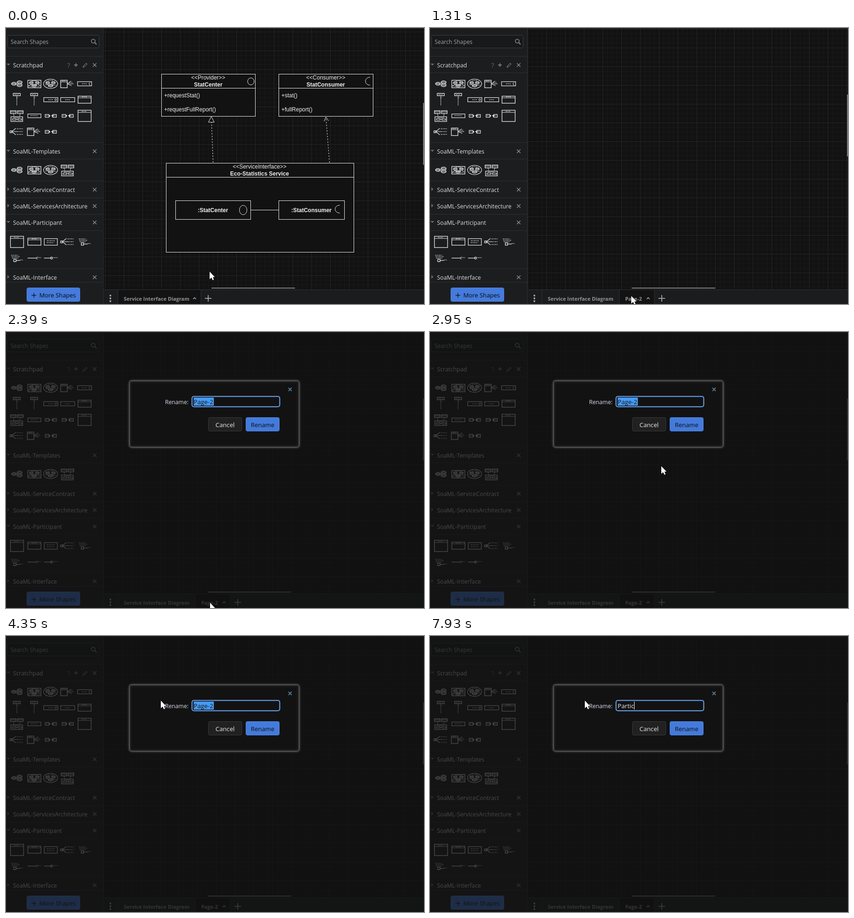
These frames come from a looping animation (891x589 px, 8000 ms). An HTML page with a canvas:

```html
<!DOCTYPE html>
<html lang="en">
<head>
<meta charset="utf-8">
<title>Rename page</title>
<style>
html, body { margin: 0; width: 100%; height: 100%; overflow: hidden; background: #121212; }
canvas { display: block; }
</style>
</head>
<body>
<canvas id="stage" width="891" height="589"></canvas>
<script>
const c = document.getElementById('stage').getContext('2d');
const W = 891, H = 589, LOOP = 8000;
const UI = '"Open Sans", "Noto Sans", sans-serif';
const ARIAL = '"Liberation Sans", Arial, sans-serif';
const INK = '#e8e8e8';

// Drawing helpers
function fill(x, y, w, h, color) {
  c.fillStyle = color;
  c.fillRect(x, y, w, h);
}
function box(x, y, w, h, color = INK, width = 1) {
  c.strokeStyle = color;
  c.lineWidth = width;
  c.strokeRect(x + .5, y + .5, w, h);
}
function line(points, color = INK, width = 1, dash = []) {
  c.strokeStyle = color;
  c.lineWidth = width;
  c.setLineDash(dash);
  c.beginPath();
  for (let i = 0; i < points.length; i += 2) c.lineTo(points[i], points[i + 1]);
  c.stroke();
  c.setLineDash([]);
}
function poly(points, color, edge) {
  c.beginPath();
  for (let i = 0; i < points.length; i += 2) c.lineTo(points[i], points[i + 1]);
  c.closePath();
  c.fillStyle = color;
  c.fill();
  if (edge) { c.strokeStyle = edge; c.lineWidth = 1; c.stroke(); }
}
function oval(x, y, rx, ry, from = 0, to = 2 * Math.PI, width = 1, color = INK) {
  c.strokeStyle = color;
  c.lineWidth = width;
  c.beginPath();
  c.ellipse(x, y, rx, ry, 0, from, to);
  c.stroke();
}
function round(x, y, w, h, r, color, edge, width = 1) {
  c.beginPath();
  c.roundRect(x + .5, y + .5, w, h, r);
  c.fillStyle = color;
  c.fill();
  c.strokeStyle = edge;
  c.lineWidth = width;
  c.stroke();
}
function text(str, x, y, font, color = INK, align = 'left') {
  c.font = font;
  c.fillStyle = color;
  c.textAlign = align;
  c.fillText(str, x, y);
}
function cross(x, y, r, color, width = 1.3) {
  line([x - r, y - r, x + r, y + r], color, width);
  line([x - r, y + r, x + r, y - r], color, width);
}
function plus(x, y, r, color, width = 1.5) {
  line([x - r, y, x + r, y], color, width);
  line([x, y - r, x, y + r], color, width);
}

// Shape thumbnails, each drawn around its own centre
const dots = (x, y, w) => line([x, y, x + w, y], INK, 1.2, [3, 1, 2, 1]);
const pill = (x, y, rx = 5, ry = 2.5) => {
  oval(x, y, rx, ry, 0, 7, 1.3);
  line([x - rx + 1, y, x + rx - 1, y], INK, 1.2);
};
const thumbs = {
  contract() {
    pill(-6, 0, 5, 3); pill(6, -3, 5.5, 3); pill(6, 3, 5.5, 3);
    dots(-12, 0, 12);
  },
  network() {
    box(-14, -8, 28, 16, INK, 1.3);
    dots(-5, -6, 10); pill(-6, -2, 4); pill(7, -2, 4); pill(0, 4, 5);
    line([-13, 5, -6, 1, 0, 4, 7, 0, 13, 4]);
    dots(-12, 5, 6); dots(7, 5, 6);
  },
  cloud() {
    oval(0, 0, 15, 10, 0, 7, 1.2);
    dots(-5, -7, 10); pill(-6, -2, 4); pill(6, -2, 4); pill(0, 4, 5);
    dots(-11, 2, 6); dots(6, 3, 6);
  },
  part() {
    box(-15, -8, 14, 16, INK, 1.3);
    line([-15, -4, -1, -4]); dots(-12, -6, 8);
    line([8, -6, -1, 0, 9, 4]); line([-1, 0, 13, 0]); dots(3, -3, 8);
  },
  roleC() { bar(); oval(12, 0, 2, 2.5, 1.2, 5); },
  roleO() { bar(); oval(11, 0, 2, 2); },
  role() { bar(); },
  lifeline() {
    box(-8, -14, 15, 5, INK, 1.3);
    dots(-5, -11, 9);
    line([0, -8, 0, 13], INK, 1.2, [2, 1]);
    line([-1, -4, 2, -4]);
  },
  panel() {
    box(-14, -8, 28, 15, INK, 1.3);
    line([-14, -4, 14, -4]); dots(-5, -6, 10);
  },
  window() {
    box(-14, -12, 28, 24, INK, 1.3);
    line([-14, -7, 14, -7]); dots(-6, -9, 11);
  },
  iface() {
    box(-14, -11, 12, 6, INK, 1.3); box(1, -11, 12, 6, INK, 1.3);
    line([-14, -8, -2, -8]); line([1, -8, 13, -8]);
    line([-7, -4, -6, 2], INK, 1.2, [2, 1]); line([7, -4, 6, 2], INK, 1.2, [2, 1]);
    box(-13, 2, 25, 10, INK, 1.3); dots(-7, 4.5, 14);
    box(-10, 6, 8, 3); box(2, 6, 8, 3); line([-2, 8, 2, 8]);
  },
  plate() {
    box(-14, -4, 28, 8, INK, 1.2); dots(-8, 0, 16);
  },
  card() {
    box(-14, -7, 28, 14, INK, 1.2); dots(-8, -2, 17); dots(-8, 2, 15);
  },
  pair() {
    box(-12, -3, 8, 6, INK, 1.2); box(4, -3, 8, 6, INK, 1.2);
    dots(-10, 0, 5); dots(6, 0, 5); line([-3, 0, 4, 0], INK, 1, [2, 2]);
    fill(-4, -1, 3, 3, INK); fill(3, -1, 3, 3, INK);
  },
  fork() {
    box(-15, -2, 4, 4, INK, 1.3);
    line([-2, -7, -11, 0, -2, 7], INK, 1.2); line([-11, 0, 0, 0]);
    for (const y of [-6, 0, 6]) dots(0, y, 13);
  },
  port() {
    dots(-12, -6, 15); dots(-11, -3, 17); dots(-10, 0, 13);
    box(-7, 2, 5, 5, INK, 1.3); line([-2, 5, 7, 5], INK, 1.3); dots(7, 4, 6);
  },
  request() { line([-14, 0, 5, 0], INK, 1.3); oval(7, 0, 2, 2.5, 1.5, 4.8); dots(7, -1, 8); },
  service() { line([-14, 0, 0, 0], INK, 1.3); oval(2, 0, 2, 2, 0, 7, 1.4); dots(6, -1, 9); }
};
function bar() { box(-15, -5, 30, 9, INK, 1.2); dots(-5, 0, 11); }

const COLS = [23, 60, 95, 131, 167];
const shelf = {
  119: 'contract network cloud part roleC',
  153: 'lifeline lifeline roleO role panel',
  187: 'iface plate pair pair window',
  221: 'fork part pair',
  303: 'contract network cloud iface',
  456: 'window panel card fork port',
  491: 'port request service'
};
const sections = [
  ['Scratchpad', 79, 1], ['SoaML-Templates', 263, 1], ['SoaML-ServiceContract', 345, 0],
  ['SoaML-ServicesArchitecture', 380, 0], ['SoaML-Participant', 415, 1], ['SoaML-Interface', 532, 0]
];

function sidebar() {
  fill(0, 0, 208, H, '#1c1d1f');
  fill(207, 0, 1, H, '#2c2d2f');
  round(3, 15, 195, 27, 3, '#18191b', '#3d3e40');
  text('Search Shapes', 10, 34, '11.9px ' + UI, '#a2a2a2');
  oval(186, 28, 4, 4, 0, 7, 1.6, '#858585');
  line([189, 31, 193, 35], '#858585', 2);
  for (const y of [60, 95, 244, 279, 326, 362, 397, 432, 513]) fill(0, y, 207, 1, '#2e2f31');

  for (const [name, y, open] of sections) {
    text(name, 15, y + 5, '12.3px ' + UI, '#dedede');
    poly(open ? [1, y - 3, 9, y - 3, 5, y + 1] : [3, y - 5, 7, y - 1, 3, y + 3], '#6c6c6c');
    cross(189, y, 3.8, '#929292');
  }
  text('?', 131, 84, '12.3px ' + UI, '#777');
  plus(149, 79, 4, '#8e8e8e');
  poly([164, 84, 165, 81, 171, 75, 173, 77, 167, 83], '#1c1d1f', '#999');

  for (const y in shelf) shelf[y].split(' ').forEach((name, i) => {
    c.save();
    c.translate(COLS[i], +y);
    thumbs[name]();
    c.restore();
  });

  fill(0, 542, 207, 47, '#1c1d1f');
  fill(0, 542, 207, 1, '#2e2f31');
  round(44, 554, 113, 29, 3, '#447bdc', '#5288e4');
  plus(59.5, 570.5, 5, '#111', 1.3);
  text('More Shapes', 71, 575, '12.8px ' + UI, '#0c0c0c');
}

function grid(x0, y0) {
  for (const [step, color] of [[10, '#191919'], [40, '#252525']]) {
    for (let x = 208 + (x0 - 208) % step; x < W; x += step) fill(x, 0, 1, 558, color);
    for (let y = y0 % step; y < 558; y += step) fill(208, y, 683, 1, color);
  }
}

function label(str, x, y, bold, align = 'center') {
  text(str, x, y, (bold ? 'bold ' : '') + '12px ' + ARIAL, '#f0f0f0', align);
}
function classBox(x, w, kind, name, ops) {
  fill(x, 98, w, 90, '#121212');
  box(x, 98, w, 90);
  line([x, 128.5, x + w, 128.5]);
  label(`<<${kind}>>`, x + w / 2, 110);
  label(name, x + w / 2, 125, true);
  ops.forEach((op, i) => label(op, x + 6, 148 + 30 * i, false, 'left'));
}
function diagram() {
  classBox(331, 200, 'Provider', 'StatCenter', ['+requestStat()', '+requestFullReport()']);
  classBox(581, 201, 'Consumer', 'StatConsumer', ['+stat()', '+fullReport()']);
  oval(522, 114, 7, 7.5);
  oval(776, 113.5, 10, 8.5, Math.PI / 2, Math.PI * 1.5);

  line([441.5, 287, 438, 201], INK, 1, [3, 3]);
  poly([437.5, 189, 444, 201, 431.5, 201], '#121212', INK);
  line([689.5, 287, 682, 190], INK, 1, [3, 3]);
  line([678, 199, 682, 190, 687.5, 198]);

  fill(341, 288, 400, 190, '#121212');
  box(341, 288, 400, 190);
  line([341, 318.5, 741, 318.5]);
  label('<<ServiceInterface>>', 540.5, 300);
  label('Eco-Statistics Service', 540.5, 315, true);
  box(361, 368, 160, 40);
  box(581, 368, 140, 40);
  line([522, 388.5, 581, 388.5]);
  label(':StatCenter', 441, 393, true);
  label(':StatConsumer', 651, 393, true);
  oval(505.5, 388.5, 8, 10);
  oval(711.5, 386.5, 10, 8.5, Math.PI / 2, Math.PI * 1.5);
}

function tabBar(second, hover) {
  const tabFont = 'bold 10.85px ' + UI, gray = '#949494';
  fill(208, 558, 683, 31, '#1b1c1e');
  fill(208, 558, 683, 1, '#303133');
  const [left, right] = second ? [403, 478] : [238, 415];
  fill(left, 559, right - left, 30, '#131313');
  for (const x of [238, left, right]) fill(x, 559, 1, 30, '#303133');
  for (const y of [571, 577, 583]) {
    c.fillStyle = '#aaa';
    c.beginPath();
    c.arc(222.5, y, 1.9, 0, 7);
    c.fill();
  }
  text('Service Interface Diagram', 251, 582, tabFont, gray);
  if (second) text('Page-2', 416, 582, tabFont, gray);
  const caret = second ? 465 : 402;
  line([caret - 3, 578.5, caret, 575.5, caret + 3, 578.5], '#aaa', 1.6);
  plus(second ? 494 : 431, 577, 7, hover ? '#4a4a4a' : '#a8a8a8', 1.8);
}

function workspace(t) {
  const second = t >= 1310;
  fill(0, 0, W, H, '#121212');
  grid(second ? 248 : 251, second ? 2 : 8);
  if (!second) diagram();
  fill(208, 0, 683, 1, '#343434');
  fill(second ? 430 : 438, 554, 178, 2, '#7c7c7c');
  fill(889, second ? 142 : 160, 2, 132, '#7c7c7c');
  tabBar(second, t >= 840 && !second);
  sidebar();
  fill(0, 0, 208, 1, '#303030');
}

// Typed text: time of each keystroke
const keys = [7070, 7220, 7380, 7620, 7770, 7930];

function dialog(t, mouseX) {
  const font = '13.2px ' + UI;
  c.save();
  c.shadowColor = '#777';
  c.shadowBlur = 5;
  round(263, 104, 361, 141, 4, '#121212', '#666');
  c.restore();
  cross(605.5, 122.5, 3.5, '#527c9a', 1.8);
  text('Rename:', 389, 154, '12.2px ' + UI, '#d9dfec', 'right');
  round(396, 137, 187, 22, 4, '#121212', '#6aa5f4', 2);

  const typed = 'Partic'.slice(0, keys.filter(k => t >= k).length);
  const value = t < 5060 ? 'Page-2' : typed;
  text(value, 400, 154, font, '#eee');
  const selectFrom = t < 3650 ? 400 : t < 5060 ? Math.max(400, mouseX) : 443;
  if (selectFrom < 443) {
    c.save();
    c.beginPath();
    c.rect(selectFrom, 140, 443 - selectFrom, 17);
    c.clip();
    fill(400, 140, 43, 17, '#479bf3');
    text(value, 400, 154, font, '#10151c');
    c.restore();
  }
  const caret = (t >= 3650 && t < 3880) || (t >= 5590 && t < 6140) || t >= 6680;
  if (caret) {
    c.font = font;
    fill(t < 5060 ? 443 : 400 + Math.round(c.measureText(value).width), 140, 1, 17, '#fff');
  }

  round(431, 182, 71, 29, 3, '#212121', '#393939');
  text('Cancel', 467, 203, font, '#ececec', 'center');
  round(511, 182, 71, 29, 3, '#447adb', '#5288e4');
  text('Rename', 547, 203, '13px ' + UI, '#0d0d0d', 'center');
}

// Pointer legs: start, steps, step length, then from, bend and end points
const legs = [
  [460, 6, 76, 434, 520, 432, 548, 429, 572],
  [1690, 2, 80, 429, 572, 432, 576, 435, 578],
  [2550, 10, 79, 435, 578, 530, 330, 470, 153],
  [3880, 4, 80, 470, 153, 405, 150, 335, 138]
];
function pointer(t) {
  const [start, steps, gap, ax, ay, bx, by, ex, ey] = legs.filter(l => t >= l[0]).pop() || legs[0];
  const p = t < start ? 0 : Math.min(1, (Math.floor((t - start) / gap) + 1) / steps);
  const s = p * p * (3 - 2 * p), q = 1 - s;
  return [q * q * ax + 2 * q * s * bx + s * s * ex, q * q * ay + 2 * q * s * by + s * s * ey];
}
function cursor(t, x, y) {
  const pressed = [[1070, 1230], [2000, 2150], [3650, 4270]].some(([a, b]) => t >= a && t < b);
  if (pressed) {
    c.fillStyle = 'rgba(232, 218, 8, .7)';
    c.beginPath();
    c.arc(x, y, 12, 0, 7);
    c.fill();
  }
  if (t >= 3180 && t < 4350) {
    x = Math.round(x) + 1.5;
    line([x, y - 6, x, y + 7], '#fff', 1.2);
    for (const dy of [-7, 8]) line([x - 3.5, y + dy, x + 3.5, y + dy], '#fff', 1.2);
    return;
  }
  if (t >= 4350) x = 330;
  const arrow = [0, 0, 0, 16, 4, 12.6, 6.5, 18, 9, 17, 6.6, 11.6, 11, 11.5];
  poly(arrow.map((v, i) => v + (i % 2 ? y : x)), '#fff', 'rgba(0, 0, 0, .55)');
  poly(arrow.map((v, i) => v + (i % 2 ? y : x)), '#fff');
}

function frame(now) {
  const t = now % LOOP;
  const [x, y] = pointer(t);
  workspace(t);
  if (t >= 2150) {
    const k = Math.min(1, Math.floor((t - 2070) / 80) / 4);
    fill(0, 0, W, H, `rgba(17, 17, 17, ${.73 * k})`);
    c.globalAlpha = k;
    dialog(t, x);
    c.globalAlpha = 1;
  }
  cursor(t, x, y);
  requestAnimationFrame(frame);
}
requestAnimationFrame(frame);
</script>
</body>
</html>
```
